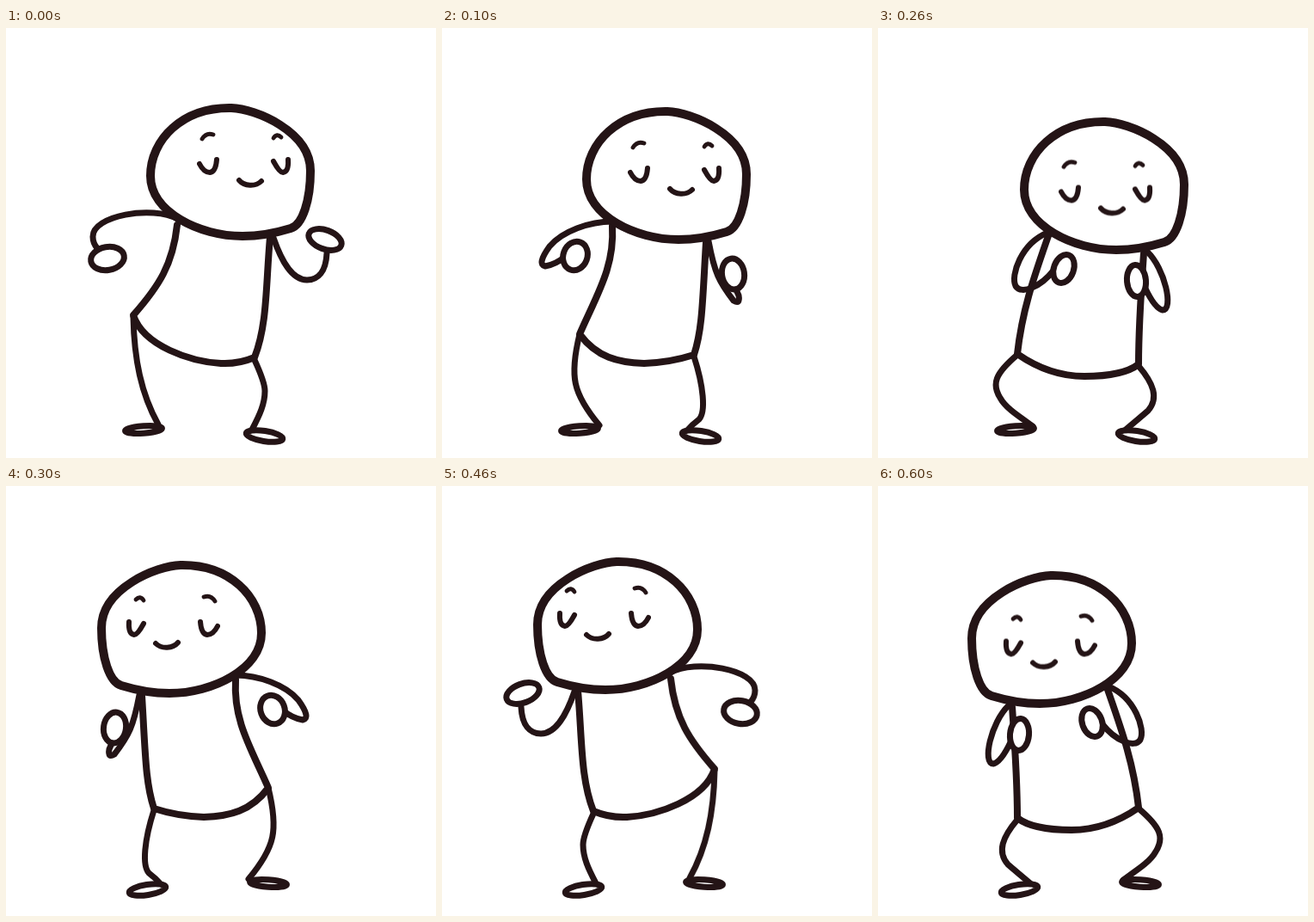
An HTML page that plays this animation: 500x500 px, repeating every 0.7 s.

```html
<!DOCTYPE html>
<html lang="en">
<head>
<meta charset="utf-8">
<title>Dancing figure</title>
<style>
  html, body { margin: 0; width: 100%; height: 100%; overflow: hidden; background: #fff; }
  svg { display: block; width: 100%; height: 100%; }
  path, ellipse {
    fill: none; stroke: #241416; stroke-width: 7;
    stroke-linecap: round; stroke-linejoin: round;
  }
  ellipse, .skull { fill: #fff; }
  .body { stroke-width: 8; }
  .skull { stroke-width: 10; }
  .face path { stroke-width: 6; }
  .face .brow { stroke-width: 4.8; }

  /* seven hard beats of 100 ms; the dance is mirrored from the fourth on */
  #dancer, .pose, .head, .face { animation: 700ms step-end infinite; }
  #dancer { animation-name: mirror; }
  #lean { animation-name: lean; }
  #swing { animation-name: swing; }
  #squat { animation-name: squat; }
  .head { animation-name: head; }
  .face { animation-name: face; }

  @keyframes mirror {
    0% { transform: none; }
    42.857%, 100% { transform: translate(465px, -5px) scale(-1, 1); }
  }
  @keyframes lean {
    0%, 57.142% { opacity: 1; }
    14.285%, 71.428%, 100% { opacity: 0; }
  }
  @keyframes swing {
    0%, 28.571%, 57.142%, 85.714%, 100% { opacity: 0; }
    14.285%, 42.857%, 71.428% { opacity: 1; }
  }
  @keyframes squat {
    0%, 42.857% { opacity: 0; }
    28.571%, 85.714%, 100% { opacity: 1; }
  }
  @keyframes head {
    0%, 57.142% { transform: none; }
    14.285%, 42.857%, 71.428% { transform: translate(0, 4px); }
    28.571%, 85.714%, 100% { transform: translate(2px, 16px); }
  }
  /* relative to the head */
  @keyframes face {
    0%, 57.142% { transform: none; }
    14.285%, 42.857%, 71.428% { transform: translate(-6px, 6px); }
    28.571%, 85.714%, 100% { transform: translate(-14px, 16.5px); }
  }
</style>
</head>
<body>
<svg viewBox="0 0 500 500">
  <g id="dancer">
    <!-- each pose: body, arms, legs, hands -->
    <g class="pose" id="lean">
      <path class="body" d="M199 229C194 275 178 300 148 334C160 370 215 388 250 390Q270 391 289 383C304 345 302 300 307 243"/>
      <path d="M200 222C170 206 100 218 101 243Q101 250 106 256"/>
      <path d="M311 244C320 270 332 293 350 293C363 293 372 283 373 262"/>
      <path d="M148 336C149 385 157 425 177 461"/>
      <path d="M289 386Q301 412 301 422C301 437 295 450 286 467"/>
      <ellipse rx="19.5" ry="13.5" transform="translate(118 268) rotate(-10)"/>
      <ellipse rx="20" ry="11" transform="translate(371 246) rotate(20)"/>
    </g>

    <g class="pose" id="swing">
      <path class="body" d="M198 230C201 278 180 310 160 356C180 383 205 389 235 390Q265 389 293 380C303 350 303 315 307 249"/>
      <path d="M198 225C172 225 140 236 125 254Q110 275 120 277Q132 275 143 266"/>
      <path d="M310 248C317 285 322 295 339 317Q347 322 345 311L341 302"/>
      <path d="M160 356C148 405 152 425 183 462"/>
      <path d="M293 382C304 416 307 446 299 455Q291 461 285 468"/>
      <ellipse rx="14" ry="17" transform="translate(155 265) rotate(20)"/>
      <ellipse rx="13" ry="18" transform="translate(338.5 286) rotate(-8)"/>
    </g>

    <g class="pose" id="squat">
      <path class="body" d="M200 236C183 285 168 325 162 379C185 395 210 405 240 405Q285 405 303 391C303 345 306 305 309 262"/>
      <path d="M197 238C166 251 154 288 160 300C167 311 190 300 204 282"/>
      <path d="M313 260C334 280 344 328 331 328Q322 326 311 303"/>
      <path d="M162 380C136 402 132 414 142 430C148 441 160 449 180 463"/>
      <path d="M303 393C320 413 327 430 314 445Q300 457 288 467"/>
      <ellipse rx="11.5" ry="17" transform="translate(216 280) rotate(20)"/>
      <ellipse rx="11" ry="18.5" transform="translate(300.5 294) rotate(-5)"/>
    </g>

    <!-- feet stay planted -->
    <ellipse rx="21.5" ry="4.2" transform="translate(160 467) rotate(-4)"/>
    <ellipse rx="21.5" ry="6" transform="translate(300.5 474.5) rotate(9)"/>

    <g class="head">
      <path class="skull" d="M262 93C205 92 168 130 168 172S225 242 275 242C300 242 318 237 331 233C345 229 354 200 354 166C354 120 290 94 262 93Z"/>
      <g class="face">
        <path d="M225 158Q230 168 237 168Q244 167 245 153"/>
        <path d="M311 155Q318 168 322 168Q329 167 328 153"/>
        <path d="M271 177C277 184 290 185 297 178"/>
        <path class="brow" d="M228 129Q233 121 241 124"/>
        <path class="brow" d="M311 128Q315 122 320 127"/>
      </g>
    </g>
  </g>
</svg>
</body>
</html>
```
